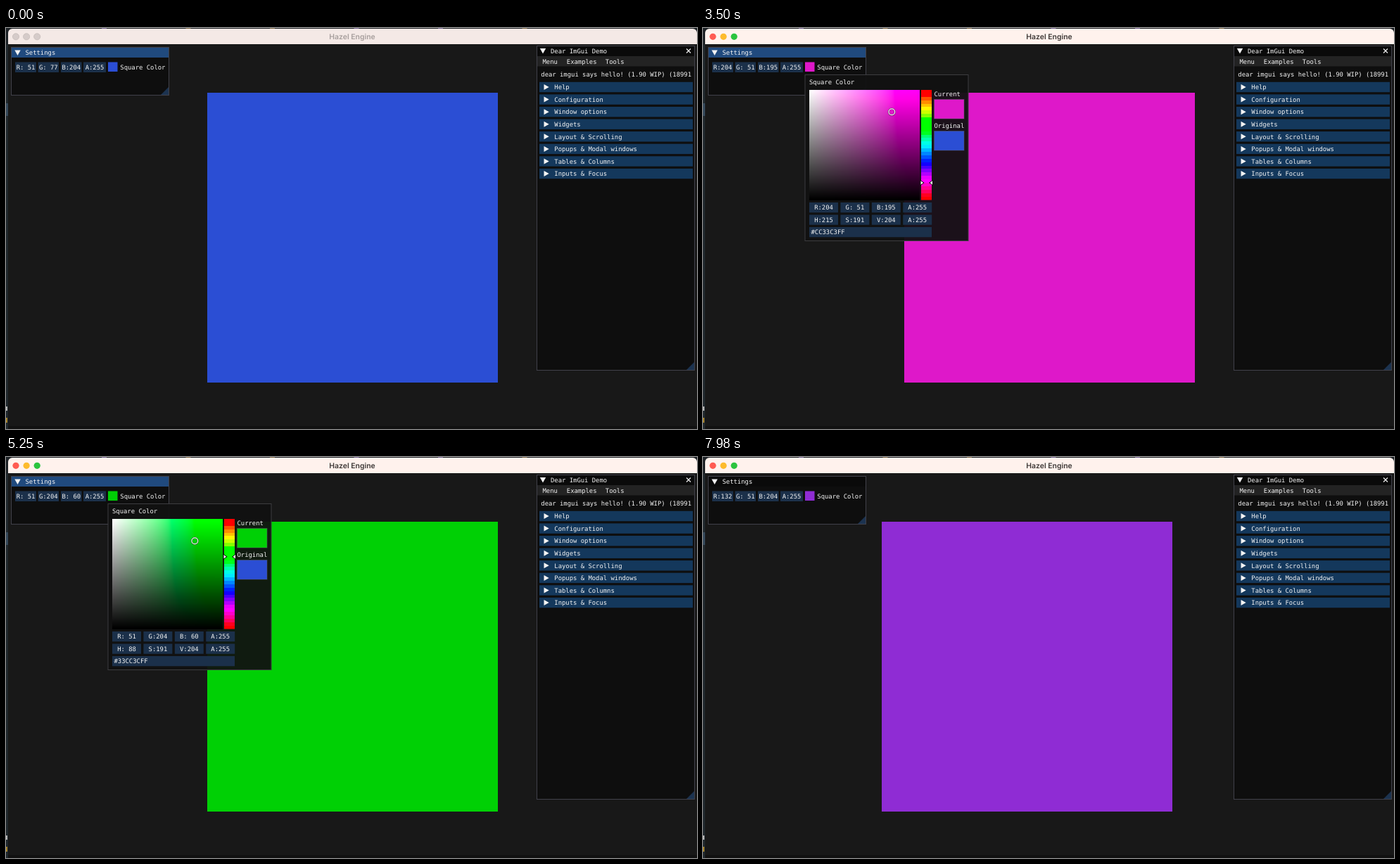
An HTML page with a canvas for the animation above (8000 ms loop, 982x570 px).

```html
<!DOCTYPE html>
<html lang="en">
<head>
<meta charset="utf-8">
<title>Engine window</title>
<style>
html, body { margin: 0; width: 100%; height: 100%; overflow: hidden; background: #181818; }
canvas { display: block; }
</style>
</head>
<body>
<canvas id="stage" width="982" height="570"></canvas>
<script>
const ctx = document.getElementById('stage').getContext('2d');
const LOOP = 8000, STEP = 70;
const MONO = '8.9px "DejaVu Sans Mono", monospace';
const WHITE = '#f4f4f4', FIELD = '#1b304a', BORDER = '#41414a';

// [time, value]
const HUE = [[0, 162.8], [3010, 162.8], [3500, 215], [3710, 228], [3850, 224],
  [4200, 43.6], [4620, 10], [4830, 8], [5250, 87.5], [5600, 182], [5880, 192.4], [LOOP, 192.4]];
const SHIFT = [[0, 0], [7000, 0], [7350, -13], [7490, -13], [7980, -32], [LOOP, -32]];
const ACTIVE_AT = 70, POPUP_AT = 1820, CLOSE_AT = 6440;
const HEADERS = ['Help', 'Configuration', 'Window options', 'Widgets', 'Layout & Scrolling',
  'Popups & Modal windows', 'Tables & Columns', 'Inputs & Focus'];

function at(keys, t) {
  let i = 1;
  while (i < keys.length - 1 && keys[i][0] < t) i++;
  const [t0, a] = keys[i - 1], [t1, b] = keys[i];
  return a + (b - a) * Math.min(1, (t - t0) / (t1 - t0));
}

function hsv(h, s, v) {
  return [5, 3, 1].map(n => {
    const k = (n + h * 6) % 6;
    return v - v * s * Math.max(0, Math.min(k, 4 - k, 1));
  });
}

// Wide-gamut colour as seen on an sRGB screen.
const toLinear = c => c <= 0.04045 ? c / 12.92 : ((c + 0.055) / 1.055) ** 2.4;
const toByte = c => {
  c = Math.max(0, Math.min(1, c));
  return Math.round(255 * (c <= 0.0031308 ? c * 12.92 : 1.055 * c ** (1 / 2.4) - 0.055));
};
function display(rgb) {
  const [r, g, b] = rgb.map(toLinear);
  return [1.2249 * r - 0.2249 * g, 1.042 * g - 0.042 * r, 1.0983 * b - 0.0196 * r - 0.0787 * g].map(toByte);
}
const css = rgb => `rgb(${display(rgb).join(',')})`;

function rect(x, y, w, h, fill, line) {
  ctx.fillStyle = fill;
  ctx.fillRect(x, y, w, h);
  if (line) {
    ctx.strokeStyle = line;
    ctx.lineWidth = 1;
    ctx.strokeRect(x, y, w, h);
  }
}

function text(str, x, y, align = 'left', font = MONO, fill = WHITE) {
  ctx.font = font;
  ctx.fillStyle = fill;
  ctx.textAlign = align;
  ctx.fillText(str, x, y);
}

function poly(fill, ...p) {
  ctx.fillStyle = fill;
  ctx.beginPath();
  for (let i = 0; i < p.length; i += 2) ctx.lineTo(p[i], p[i + 1]);
  ctx.fill();
}

function circle(x, y, r, fill, line, width = 1) {
  ctx.beginPath();
  ctx.arc(x, y, r, 0, 7);
  if (fill) { ctx.fillStyle = fill; ctx.fill(); }
  if (line) { ctx.strokeStyle = line; ctx.lineWidth = width; ctx.stroke(); }
}

const arrowDown = (x, y) => poly(WHITE, x - 4.2, y - 3.5, x + 4.2, y - 3.5, x, y + 4);
const arrowRight = (x, y) => poly(WHITE, x - 3, y - 4, x + 4.2, y, x - 3, y + 4);
const grip = (x, y) => poly('#1c3350', x, y - 11, x, y, x - 11, y);

const SV = 78;
const pad = document.createElement('canvas');
pad.width = pad.height = SV;
const padCtx = pad.getContext('2d');
const pixels = padCtx.createImageData(SV, SV);
let padHue = -1;
function paintPad(hue) {
  if (hue === padHue) return;
  padHue = hue;
  for (let y = 0, i = 0; y < SV; y++) {
    for (let x = 0; x < SV; x++, i += 4) {
      pixels.data.set(display(hsv(hue, x / (SV - 1), 1 - y / (SV - 1))), i);
      pixels.data[i + 3] = 255;
    }
  }
  padCtx.putImageData(pixels, 0, 0);
}

const BANDS = 32;
const bandColors = Array.from({ length: BANDS }, (_, i) => css(hsv(i / (BANDS - 1), 1, 1)));

const field = (label, value) => label + ':' + String(value).padStart(3);

function desktop() {
  rect(0, 0, 982, 570, '#1d2226');
  rect(0, 24, 3, 546, '#20282d');
  rect(0, 107, 3, 18, '#34485a');
  for (let x = 136; x < 800; x += 119.5) rect(x, 0, 7, 1, x % 2 < 1 ? '#6a5a8c' : '#75603c');
  rect(0, 538, 2, 6, '#b8b8b8');
  rect(0, 554, 2, 7, '#a8842a');
}

function frame(active) {
  rect(3, 12, 979, 558, '#181818');
  rect(3, 566, 979, 4, '#111');
  ctx.fillStyle = active ? '#fff2ed' : '#f4e9e6';
  ctx.beginPath();
  ctx.roundRect(3, 1, 979, 22, [6, 6, 0, 0]);
  ctx.fill();
  ['#ff5b52', '#fdbb2d', '#2bc43f'].forEach((c, i) =>
    circle(14 + i * 15.1, 12.3, 4.6, active ? c : '#d5cbc9', active ? null : '#c3b9b7', 0.7));
  text('Hazel Engine', 492, 15.6, 'center', '600 10.4px Inter, sans-serif', active ? '#3c3735' : '#a69e9c');
}

function settings(rgb, focused) {
  rect(7.5, 27.5, 224, 68, '#0e0e0e', BORDER);
  rect(8, 28, 223, 14, focused ? '#204a7e' : '#0a0a0a');
  arrowDown(16.5, 35);
  text('Settings', 27.5, 38.3);
  const values = [...rgb.map(c => Math.round(c * 255)), 255];
  [[13, 30], [45.5, 29.5], [78, 29.5], [110, 32]].forEach(([x, w], i) => {
    rect(x, 48.5, w, 14.5, FIELD);
    text(field('RGBA'[i], values[i]), x + w / 2, 59.2, 'center');
  });
  rect(145, 48.5, 13.5, 13.5, css(rgb));
  text('Square Color', 162.3, 59.2);
  grip(231, 95);
}

function demo() {
  rect(754.5, 25.5, 224, 461, '#0e0e0e', BORDER);
  rect(755, 26, 223, 14, '#0a0a0a');
  rect(755, 40, 223, 14.5, '#232323');
  arrowDown(763, 32.5);
  text('Dear ImGui Demo', 774, 36.2);
  ctx.strokeStyle = WHITE;
  ctx.lineWidth = 1.1;
  ctx.beginPath();
  ctx.moveTo(967, 29.5); ctx.lineTo(973, 35.5);
  ctx.moveTo(973, 29.5); ctx.lineTo(967, 35.5);
  ctx.stroke();
  text('Menu', 762.5, 50.8);
  text('Examples', 796.8, 50.8);
  text('Tools', 851.8, 50.8);
  text('dear imgui says hello! (1.90 WIP) (18991', 760.3, 69);
  HEADERS.forEach((name, i) => {
    const y = 84 + i * 17.58;
    rect(758, y - 7.2, 218, 14.4, '#14385c');
    arrowRight(767.5, y);
    text(name, 779.3, y + 3.3);
  });
  grip(978, 486);
}

function picker(rgb, hue) {
  rect(145, 66.5, 232, 236, 'rgba(17,17,17,.95)', '#3d3d40');
  text('Square Color', 151, 80.3);

  paintPad(hue);
  ctx.drawImage(pad, 151, 88, 156.5, 156.5);
  bandColors.forEach((c, i) => {
    const y = Math.round(88 + i * 156.5 / BANDS);
    rect(310, y, 15, Math.min(244.5, Math.round(88 + (i + 1) * 156.5 / BANDS)) - y, c);
  });
  const y = 88 + hue * 156.5;
  poly('#000', 309, y - 4, 314.5, y, 309, y + 4);
  poly('#000', 326.5, y - 4, 321, y, 326.5, y + 4);
  poly('#fff', 309.5, y - 2.8, 313, y, 309.5, y + 2.8);
  poly('#fff', 326, y - 2.8, 322.5, y, 326, y + 2.8);
  circle(268.3, 119.3, 4.6, css(rgb), 'rgba(60,60,60,.6)', 2.4);
  circle(268.3, 119.3, 4.4, null, '#f0f0f0', 1.2);

  text('Current', 328.5, 96.6);
  rect(328.5, 101.5, 42.5, 27.5, css(rgb), 'rgba(90,90,100,.5)');
  text('Original', 328.5, 141.7);
  rect(328.5, 146.5, 42.5, 27.5, css([0.2, 0.302, 0.8]), 'rgba(90,90,100,.5)');

  const bytes = rgb.map(c => Math.round(c * 255));
  const rows = [['RGBA', [...bytes, 255]], ['HSVA', [Math.round(hue * 255), 191, 204, 255]]];
  rows.forEach(([labels, values], r) => values.forEach((v, i) => {
    const x = 151 + i * 44.4, top = 248 + r * 17.5;
    rect(x, top, 41, 14.3, FIELD);
    text(field(labels[i], v), x + 20.5, top + 10.4, 'center');
  }));
  rect(151, 283, 174, 14.3, FIELD);
  const hex = bytes.map(b => b.toString(16).padStart(2, '0')).join('').toUpperCase();
  text('#' + hex + 'FF', 153.5, 293.4);
}

function draw(t) {
  const hue = at(HUE, t) / 255;
  const rgb = hsv(hue, 0.75, 0.8);
  ctx.textRendering = 'geometricPrecision';
  desktop();
  frame(t >= ACTIVE_AT);
  rect(286 + at(SHIFT, t), 92, 413, 412, css(rgb));
  demo();
  settings(rgb, t < CLOSE_AT);
  if (t >= POPUP_AT && t < CLOSE_AT) picker(rgb, hue);
}

const start = performance.now();
function tick() {
  const t = (performance.now() - start) % LOOP;
  draw(Math.floor(t / STEP) * STEP);
  requestAnimationFrame(tick);
}
tick();
</script>
</body>
</html>
```
